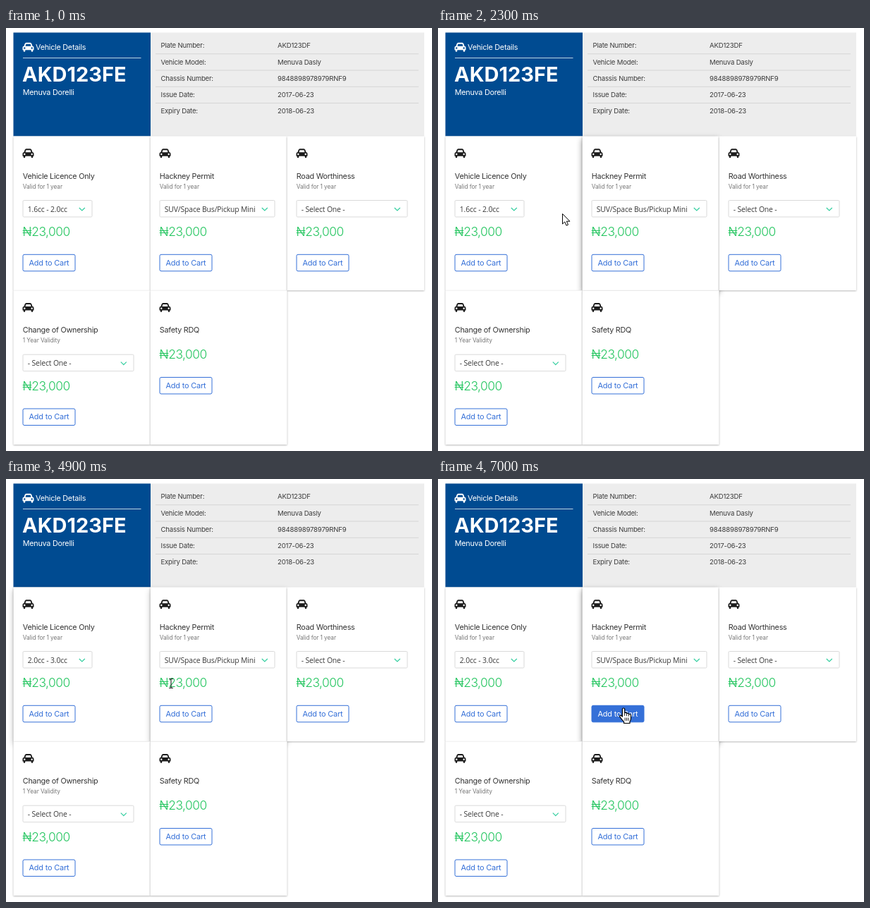
These frames come from a looping animation (604 px wide and 600 px high, 7.1 s). An HTML page:

```html
<!DOCTYPE html>
<html lang="en">
<head>
<meta charset="utf-8">
<title>Vehicle details</title>
<style>
  html, body { margin: 0; width: 100%; height: 100%; overflow: hidden; background: #fff; }
  svg { display: block; width: 604px; height: 600px; }
  text { font-family: Inter, Roboto, sans-serif; fill: #333; white-space: pre; }
  .title { font-size: 10.8px; letter-spacing: -.25px; }
  .sub { font-size: 8.3px; letter-spacing: -.09px; fill: #777; }
  .cell { font-size: 9.6px; letter-spacing: -.2px; fill: #3c3c3c; }
  .price { font-size: 17.4px; letter-spacing: -.5px; font-weight: 300; fill: #22c55e; }
  .plate { font-size: 29px; font-weight: 700; }
  .btn { font-size: 10.9px; letter-spacing: -.16px; }
  .opt { font-family: "Open Sans", "Noto Sans", sans-serif; font-size: 10.4px; letter-spacing: -.14px; fill: #3a3a3a; }
  .white { fill: #fff; }
</style>
</head>
<body>
<svg id="stage" viewBox="0 0 604 600" xmlns="http://www.w3.org/2000/svg"></svg>
<script>
const LOOP = 7100;
const BLUE = [53, 112, 216], WHITE = [255, 255, 255];
const GREEN = '#35cfa0', GREY = '#d9d9d9', DARK = '#555';
const ROW = 14.8;

const CAR = 'M1.9 5 3.2 1.5Q3.7 0 5.2 0H10.8Q12.3 0 12.8 1.5L14.1 5Q16 5.2 16 7V10.4H14.8V11.6a1.3 1.3 0 0 1-2.6 0V10.4H3.8V11.6a1.3 1.3 0 0 1-2.6 0V10.4H0V7Q0 5.2 1.9 5Z' +
  'M4 5H12L11.1 2H4.9ZM1.6 7.7a1.2 1.2 0 1 0 2.4 0a1.2 1.2 0 1 0-2.4 0ZM12 7.7a1.2 1.2 0 1 0 2.4 0a1.2 1.2 0 1 0-2.4 0Z';

const cards = [
  { x: 10.5, y: 153.5, w: 194, title: 'Vehicle Licence Only', sub: 'Valid for 1 year', pick: '1.6cc - 2.0cc', sw: 98 },
  { x: 204.5, y: 153.5, w: 194, title: 'Hackney Permit', sub: 'Valid for 1 year', pick: 'SUV/Space Bus/Pickup Mini', sw: 163 },
  { x: 398.5, y: 153.5, w: 194.5, title: 'Road Worthiness', sub: 'Valid for 1 year', pick: '- Select One -', sw: 157 },
  { x: 10.5, y: 372.2, w: 194, title: 'Change of Ownership', sub: '1 Year Validity', pick: '- Select One -', sw: 157 },
  { x: 204.5, y: 372.2, w: 194, title: 'Safety RDQ' }
];

const details = [
  ['Plate Number:', 'AKD123DF'],
  ['Vehicle Model:', 'Menuva Dasly'],
  ['Chassis Number:', '9848898978979RNF9'],
  ['Issue Date:', '2017-06-23'],
  ['Expiry Date:', '2018-06-23']
];

const menus = [
  { card: 0, items: ['- Select One -', '1.6cc - 2.0cc', '2.0cc - 3.0cc', 'Above 3.0cc', 'below 16cc'] },
  { card: 1, items: ['- Select One -', 'Car', 'SUV/Space Bus/Pickup Mini', 'Tipper/Lorry/Tanker/Trailer', 'Charter Bus', 'BRT'] }
];

const text = (x, y, cls, s, id = '') => `<text x="${x}" y="${y}" class="${cls}" ${id && `id="${id}"`}>${s}</text>`;
const rect = (x, y, w, h, attrs) => `<rect x="${x}" y="${y}" width="${w}" height="${h}" ${attrs}/>`;
const car = (x, y, fill) => `<path d="${CAR}" transform="translate(${x} ${y})" fill="${fill}" fill-rule="evenodd"/>`;

function header() {
  let s = rect(10.5, 6.5, 582.5, 147, 'fill="#ededed"') + rect(10.5, 6.5, 194.5, 147, 'fill="#004b91"');
  s += car(23.5, 20.8, '#fff') + text(42, 31.2, 'title white', 'Vehicle Details');
  s += rect(24, 42, 167.5, 1, 'fill="#fff" opacity=".75"');
  s += text(23, 76, 'plate white', 'AKD123FE') + text(23.8, 95.2, 'title white', 'Menuva Dorelli');
  details.forEach(([key, value], i) => {
    const y = 28.3 + 23.25 * i;
    s += text(219.5, y, 'cell', key) + text(385, y, 'cell', value);
    if (i) s += rect(212, y - 15.3, 373, 1, 'fill="#d6d6d6"');
  });
  return s;
}

function card(c, i) {
  const { x, y, w } = c, left = x + 13.3;
  const priceY = y + (c.sw ? 141.6 : 97), btnY = y + (c.sw ? 167.8 : 123.3);
  let s = rect(x, y + 4, w, 218.5, `id="lift${i}" filter="url(#soft)" opacity="0"`);
  s += rect(x, y + 1, w, 218.5, 'filter="url(#edge)" opacity=".32"') + rect(x, y, w, 218.7, 'fill="#fff"');
  s += car(left - .3, y + 17.8, '#1c1c1c') + text(left, y + 60, 'title', c.title);
  if (c.sw) {
    const cx = left + c.sw - 14, cy = y + 101.5;
    s += text(left, y + 74, 'sub', c.sub);
    s += rect(left + .2, y + 91, c.sw, 23.5, `id="box${i}" rx="1.5" fill="#fff" stroke="${GREY}"`);
    s += text(left + 7, y + 107.2, 'opt', c.pick, 'pick' + i);
    s += `<path id="chev${i}" d="M${cx - 4} ${cy}l4 4 4-4" fill="none" stroke="${GREEN}" stroke-width="1.2"/>`;
  }
  s += text(left - .5, priceY, 'price', '₦23,000');
  s += rect(left + .2, btnY, 74, 23.5, `id="fill${i}" rx="2" fill="#fff" stroke="rgb(${BLUE})"`);
  return s + text(left + 8.6, btnY + 15.3, 'btn', 'Add to Cart', 'label' + i);
}

function menu({ card: n, items }) {
  const c = cards[n], x = c.x + 13.5, y = c.y + 114;
  let s = rect(x, y, c.sw, items.length * ROW + 2, 'fill="#fff" stroke="#4472c4"');
  s += rect(x + .5, y + 1, c.sw - 1, ROW, `id="mark${n}" fill="#1e90ff"`);
  items.forEach((item, i) => s += text(x + 6.8, y + 12.4 + ROW * i, 'opt', item, `opt${n}_${i}`));
  return `<g id="menu${n}">${s}</g>`;
}

const pointers = `
  <g id="cursor" stroke-linejoin="round" stroke-linecap="round">
    <path id="arrow" d="M0 0V14L3.2 11 5.5 16.2 8 15.1 5.8 10.2H10Z" fill="#fff" stroke="#000"/>
    <g id="hand">
      <path d="M-1.6 1.4Q-1.6 0 0 0T1.7 1.4V6.6Q4.2 5.8 4.6 7.5 7 6.8 7.5 8.6 10.5 8 10.5 10.6V14.5Q10.5 17 9 19V21.5H.6V19.4Q-2.4 16.5-5.3 12.2-5.6 10-3.6 10.2L-1.6 12Z" fill="#fff" stroke="#000" stroke-width="1.2"/>
      <path d="M1.7 6.6V10.5M4.6 7.5V10.8M7.5 8.6V11.2M2.2 14V17.5M4.6 14V17.5M7 14V17.5" fill="none" stroke="#000" stroke-width=".9"/>
    </g>
    <path id="beam" d="M-2.5-6.5H-.8L0-5.8.8-6.5H2.5M0-5.8V5.8M-2.5 6.5H-.8L0 5.8.8 6.5H2.5" fill="none" stroke="#222" stroke-width="1.1"/>
  </g>`;

const stage = document.getElementById('stage');
stage.innerHTML = `
  <defs>
    <filter id="soft" x="-15%" y="-15%" width="130%" height="130%"><feGaussianBlur stdDeviation="4"/></filter>
    <filter id="edge" x="-5%" y="-5%" width="110%" height="110%"><feGaussianBlur stdDeviation=".9"/></filter>
  </defs>` + header() + cards.map(card).join('') + menus.map(menu).join('') + pointers;

const $ = id => document.getElementById(id);
const set = (id, name, value) => $(id).setAttribute(name, value);
const show = (id, on) => set(id, 'visibility', on ? 'inherit' : 'hidden');
const clamp = v => Math.max(0, Math.min(1, v));
const within = (t, spans) => spans.some(([a, b]) => t >= a && t < b);

// Eases in at the start of each span and out after its end.
const fade = (t, spans, d) => Math.max(...spans.map(([a, b]) => Math.min(clamp((t - a) / d), 1 - clamp((t - b) / d))));
const at = (t, steps) => steps.reduce((v, s) => t >= s[0] ? s[1] : v, steps[0][1]);

// Pointer stops: time, x, y
const path = [
  [100, 608, 580], [500, 576, 515], [1300, 270, 268], [2000, 270, 268], [2600, 84, 260], [2750, 84, 262],
  [2900, 84, 287], [3200, 80, 308], [3500, 80, 308], [3900, 67, 325], [4600, 67, 325], [4900, 234, 290],
  [5200, 273, 260], [5450, 273, 260], [5700, 275, 284], [6100, 278, 308], [6500, 278, 308], [6800, 263, 325], [7100, 263, 325]
];
const shapes = [
  [0, 'arrow'], [1270, 'hand'], [2050, 'arrow'], [2450, 'hand'], [2800, 'arrow'], [3780, 'hand'],
  [4670, 'arrow'], [4830, 'beam'], [5000, 'arrow'], [5080, 'hand'], [5500, 'arrow'], [6700, 'hand']
];
const lifts = [[[2300, 4780]], [[1050, 2300], [4740, 9000]]];
const boxHover = [[[2450, 2800]], [[1250, 2100], [5080, 5500]]];
const boxFocus = [[[2800, 4300]], [[5500, 6950]]];
const btnHover = [[[3780, 4640]], [[6700, 9000]]];
const opened = [[2800, 3500], [5500, 6500]];
const marks = [[[0, 0], [3000, 1], [3100, 2]], [[0, 0], [5800, 1], [5950, 2]]];

function position(t) {
  const i = path.findIndex(p => p[0] > t);
  if (i < 1) return path[0].slice(1);
  const [a, x, y] = path[i - 1], [b, u, v] = path[i];
  const k = (t - a) / (b - a), e = k * k * (3 - 2 * k);
  return [x + (u - x) * e, y + (v - y) * e];
}

function draw(t) {
  for (const n of [0, 1]) {
    const focus = within(t, boxFocus[n]), hover = within(t, boxHover[n]), open = within(t, [opened[n]]);
    const k = fade(t, btnHover[n], 120);
    set('lift' + n, 'opacity', .42 * fade(t, lifts[n], 300));
    set('box' + n, 'stroke', focus ? GREEN : hover ? '#8a8a8a' : GREY);
    set('chev' + n, 'stroke', open || hover ? DARK : GREEN);
    set('fill' + n, 'fill', `rgb(${WHITE.map((c, i) => c + (BLUE[i] - c) * k)})`);
    $('label' + n).style.fill = `rgb(${BLUE.map((c, i) => c + (WHITE[i] - c) * k)})`;
    const mark = at(t, marks[n]);
    show('menu' + n, open);
    set('mark' + n, 'transform', `translate(0 ${mark * ROW})`);
    menus[n].items.forEach((_, i) => $(`opt${n}_${i}`).classList.toggle('white', i === mark));
  }
  $('pick0').textContent = t < 3500 ? '1.6cc - 2.0cc' : '2.0cc - 3.0cc';
  const shape = at(t, shapes);
  show('cursor', t >= 100);
  set('cursor', 'transform', `translate(${position(t)})`);
  for (const s of ['arrow', 'hand', 'beam']) show(s, s === shape);
}

for (const n of [2, 3, 4]) $('label' + n).style.fill = `rgb(${BLUE})`;

const start = performance.now();
function tick() {
  draw((performance.now() - start) % LOOP);
  requestAnimationFrame(tick);
}
tick();
</script>
</body>
</html>
```
